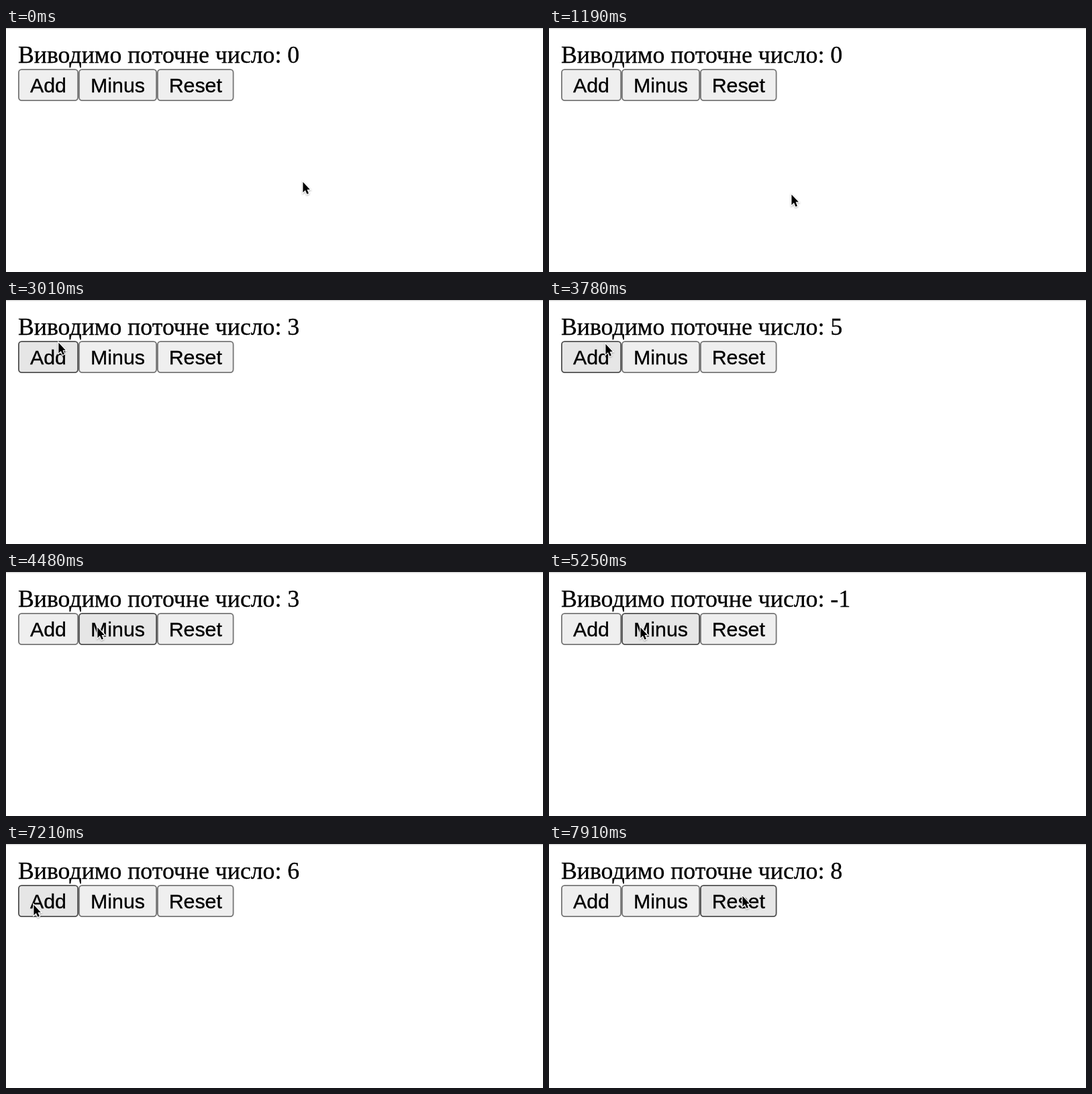
Recreate the animation shown at these times as an HTML page. Size 800x364 px, loop 8000 ms.

```html
<!DOCTYPE html>
<html lang="uk">
<head>
<meta charset="utf-8">
<title>Counter</title>
<style>
  html, body { margin: 0; width: 100%; height: 100%; overflow: hidden; background: #fff; }
  svg { display: block; }
  text { stroke: #000; stroke-width: .35; }
  #label { font: 35.75px "Liberation Serif", Times, serif; }
  .button text { font: 30.3px "Liberation Sans", Arial, sans-serif; text-anchor: middle; }
  .button rect { fill: #efefef; stroke: #767676; stroke-width: 1.8; }
  .hover rect { fill: #e6e6e6; stroke: #4f4f4f; }
  .active rect { fill: #f4f4f4; stroke: #808080; }
  #cursor { filter: drop-shadow(0 1.5px 1px rgba(0, 0, 0, .3)); }
</style>
</head>
<body>
<svg width="800" height="364" viewBox="0 0 800 364">
  <rect width="800" height="1.4" fill="#d6d6d6"/>
  <text id="label" x="18" y="52">Виводимо поточне число: <tspan id="count">0</tspan></text>
  <g id="buttons"></g>
  <path id="cursor" d="M.4 .8V16.2L3.9 12.9L6.4 18.8L8.9 17.7L6.5 11.9H10.8Z"
        stroke="#fff" stroke-width="2.4" paint-order="stroke"/>
</svg>
<script>
const LOOP = 8000, STEP = 70;
const $ = id => document.getElementById(id);

const buttons = [["Add", 18, 108], ["Minus", 108, 225], ["Reset", 225, 339.5]]
  .map(([name, left, right]) => ({ name, left, right }));
$("buttons").innerHTML = buttons.map(({ name, left, right }) => `<g class="button">
  <rect x="${left + .9}" y="61.9" width="${right - left - 1.8}" height="46.2" rx="4.5"/>
  <text x="${(left + right) / 2}" y="96">${name}</text></g>`).join("");
buttons.forEach((b, i) => b.node = $("buttons").children[i]);

// Evenly spaced runs of clicks; each time is when the mouse button is released
const run = (start, gap, count, delta) =>
  Array.from({ length: count }, (_, i) => ({ time: start + i * gap, delta }));
const clicks = [
  ...run(2450, 280, 5, 1),
  ...run(4288, 192, 7, -1),
  ...run(5950, 175, 10, 1)
];

// Pointer moves: start, end, target x, target y, downward bow
const moves = [
  [980, 1680, 67, 83, 80],
  [1890, 2170, 78, 63, 0],
  [3710, 4060, 136, 82, 0],
  [5460, 5810, 41, 90, 0],
  [7560, 7910, 288, 77, 0]
];
moves[1][0] = 1960;

function pointer(t) {
  let x = 442, y = 229;
  for (const [start, end, toX, toY, bow] of moves) {
    const p = Math.min(1, Math.max(0, (t - start) / (end - start)));
    const k = p * p * (3 - 2 * p);
    x += (toX - x) * k;
    y += (toY - y) * k + bow * Math.sin(Math.PI * k);
  }
  return [x, y];
}

function draw(now) {
  const t = Math.min(LOOP - 90, Math.floor(now % LOOP / STEP) * STEP);
  const [x, y] = pointer(t);
  const pressed = clicks.some(({ time }) => time > t && time - t <= STEP);
  $("count").textContent = clicks.reduce((sum, c) => sum + (c.time <= t ? c.delta : 0), 0);
  $("cursor").setAttribute("transform", `translate(${x} ${y})`);
  for (const { left, right, node } of buttons) {
    const over = x >= left && x < right && y >= 61 && y < 109;
    node.setAttribute("class", "button" + (over ? pressed ? " active" : " hover" : ""));
  }
}

const origin = performance.now();
function tick() {
  draw(performance.now() - origin);
  requestAnimationFrame(tick);
}
tick();
</script>
</body>
</html>
```
